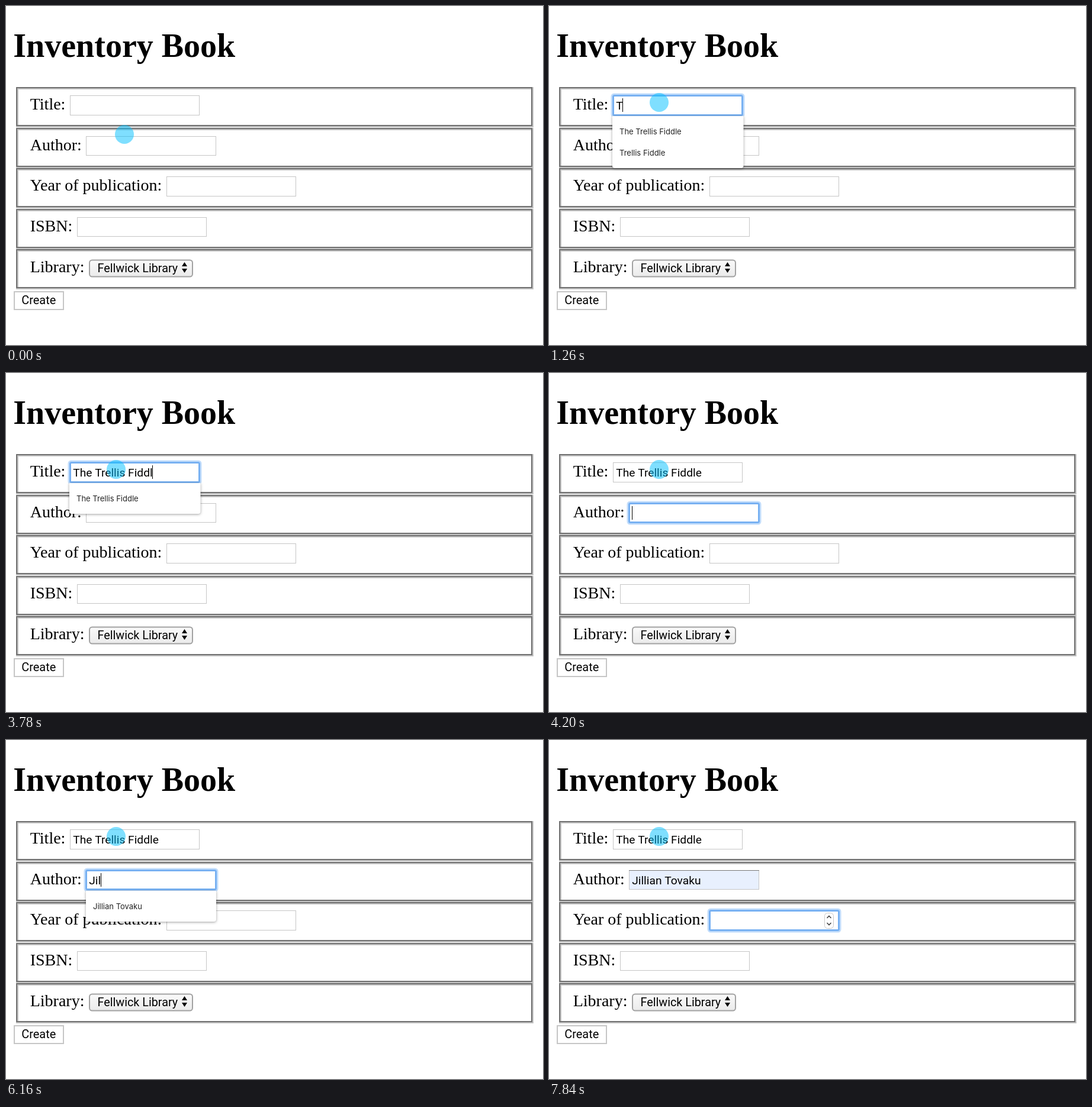
Write an HTML page with a canvas that moves like this. It is 907x573 px and loops after 8 s.

```html
<!DOCTYPE html>
<html lang="en">
<head>
<meta charset="utf-8">
<title>Inventory form</title>
<style>
  html, body { margin: 0; width: 100%; height: 100%; overflow: hidden; background: #fff; }
  canvas { display: block; }
</style>
</head>
<body>
<canvas id="stage" width="907" height="573"></canvas>
<script>
const ctx = document.getElementById('stage').getContext('2d');
const LOOP = 8000;

const SERIF = '"Liberation Serif", "Times New Roman", serif';
const INPUT = '19.2px Roboto, sans-serif';
const LIST = '13px Inter, sans-serif';

const BOOK = 'The Trellis Fiddle';
const WRITER = 'Jillian Tovaku';
const BOOKS = [BOOK, 'Trellis Fiddle', 'po', 'Lambc', 'Lamb'];

const title = { label: 'Title:', x: 108, y: 151, w: 219, h: 34 };
const author = { label: 'Author:', x: 135, y: 220, w: 220, h: 33 };
const year = { label: 'Year of publication:', x: 271, y: 288, w: 219, h: 34 };
const isbn = { label: 'ISBN:', x: 120, y: 357, w: 219, h: 33 };
const fields = [title, author, year, isbn];

// [time, value] steps: the last one reached is in force
const titleKeys = [[0, 0],
  [1260, 1], [1400, 2], [1540, 3], [1680, 4], [1820, 6], [1960, 7], [2100, 8], [2240, 9],
  [2660, 10], [2800, 11], [2940, 12], [3080, 13], [3220, 14],
  [3500, 15], [3640, 16], [3780, 17], [3920, 18]];
const authorKeys = [[0, 0], [4900, 1], [5040, 2], [5180, 3], [6440, WRITER.length]];
const focusKeys = [[0, null], [560, title], [4200, author], [7280, year]];
const caretKeys = [[0, true], [980, false], [1260, true], [4620, false], [4900, true],
  [5740, false], [6160, true], [6440, false], [6860, true], [7840, false]];
const dotKeys = [[0, [200, 217]], [140, [177, 165]], [280, [184, 181]], [840, [186, 163]]];
const bookListKeys = [[0, 0], [560, 5], [1260, 2], [1400, 1], [3920, 0]];

function at(keys, t) {
  let value = keys[0][1];
  for (const [time, next] of keys) if (t >= time) value = next;
  return value;
}

function rect(x, y, w, h, color) {
  ctx.fillStyle = color;
  ctx.fillRect(x, y, w, h);
}

function text(str, x, y, font, color = '#000') {
  ctx.font = font;
  ctx.fillStyle = color;
  ctx.fillText(str, x, y);
}

function rounded(x, y, w, h, r) {
  ctx.beginPath();
  ctx.roundRect(x, y, w, h, r);
}

function outline(color, width) {
  ctx.strokeStyle = color;
  ctx.lineWidth = width;
  ctx.stroke();
}

function polyline(points) {
  ctx.beginPath();
  for (const [x, y] of points) ctx.lineTo(x, y);
}

function groove(x, y, w, h) {
  const dark = '#707070', light = '#c4c4c4';
  rect(x, y, w, h, light);
  rect(x, y, w - 2, h - 2, dark);
  rect(x + 2, y + 2, w - 4, h - 4, dark);
  rect(x + 2, y + 2, w - 6, h - 6, light);
  rect(x + 4, y + 4, w - 8, h - 8, '#fff');
}

function drawField(f, value, focused, filled, caret) {
  const { x, y, w, h } = f;
  rect(x, y, w, h, '#c6c6c6');
  rect(x + 1, y + 1, w - 2, h - 2, filled ? '#e8f0fe' : '#fff');
  if (filled) rect(x, y, w, 1, '#777');
  if (focused) {
    rounded(x - 1, y - 1, w + 2, h + 2, 3);
    outline('rgba(120,180,246,.45)', 5);
    rounded(x + .5, y + .5, w - 1, h - 1, 2);
    outline('#78b1f2', 3);
  }
  text(value, x + 5.2, y + 24, INPUT);
  if (focused && caret) {
    const end = x + 5 + ctx.measureText(value).width;
    rect(Math.round(end), y + 5, 1, 23, '#000');
  }
}

function drawList(f, items, picked, alpha = 1) {
  if (!items.length) return;
  const x = f.x - (f === title ? 1 : 0), y = f.y + 35, w = f === title ? 221.5 : 220;
  ctx.save();
  ctx.globalAlpha = alpha;
  ctx.shadowColor = 'rgba(0,0,0,.38)';
  ctx.shadowBlur = 4;
  ctx.shadowOffsetY = 1;
  ctx.fillStyle = '#fff';
  rounded(x, y, w, items.length * 36 + 16, [0, 0, 4, 4]);
  ctx.fill();
  ctx.shadowColor = 'transparent';
  items.forEach((item, i) => {
    if (picked) rect(x, y + 8 + i * 36, w, 36, '#ebebeb');
    text(item, x + 12, y + 31 + i * 36, LIST, '#222');
  });
  ctx.restore();
}

function drawSelect() {
  const fill = ctx.createLinearGradient(0, 429, 0, 458);
  fill.addColorStop(0, '#fafafa');
  fill.addColorStop(1, '#eaeaea');
  rounded(141, 429.5, 174, 28, 4.5);
  ctx.fillStyle = fill;
  ctx.fill();
  outline('#a2a2a2', 2);
  text('Fellwick Library', 154.5, 450, '19.8px Roboto, sans-serif');
  for (const [base, tip] of [[440, 433], [444, 451]]) {
    polyline([[297, base], [306, base], [301.5, tip]]);
    ctx.fill();
  }
}

function drawSpinner() {
  rounded(465.5, 292.5, 15, 26, 5);
  ctx.fillStyle = '#fff';
  ctx.fill();
  outline('#c8c8c8', 1);
  for (const [base, tip] of [[301, 297.5], [309, 312.5]]) {
    polyline([[469.5, base], [473, tip], [476.5, base]]);
    outline('#444', 1.6);
  }
}

function drawPointer(t) {
  const [x, y] = at(dotKeys, t);
  const pressed = t >= 560 && t < 700;
  ctx.beginPath();
  ctx.arc(x, y, pressed ? 19.5 : 16, 0, Math.PI * 2);
  if (pressed) {
    outline('rgba(0,180,240,.32)', 2.5);
  } else {
    ctx.fillStyle = 'rgba(0,191,255,.5)';
    ctx.fill();
  }
}

function draw(t) {
  rect(0, 0, 907, 573, '#fff');
  text('Inventory Book', 12.3, 86, 'bold 56px ' + SERIF);

  for (let i = 0; i < 5; i++) {
    const top = Math.round(137 + i * 68.5);
    groove(17, top, 874, 68);
    const label = i < 4 ? fields[i].label : 'Library:';
    text(label, 40.7, Math.round(175 + i * 68.7), '28px ' + SERIF);
  }

  const focus = at(focusKeys, t);
  const caret = at(caretKeys, t);
  for (const f of fields) {
    let value = '';
    if (f === title) value = BOOK.slice(0, at(titleKeys, t));
    if (f === author) value = WRITER.slice(0, at(authorKeys, t));
    drawField(f, value, f === focus, f === author && t >= 6440, caret);
  }
  if (focus === year) drawSpinner();

  drawSelect();
  rect(13, 482, 85, 32, '#c6c6c6');
  rect(15, 484, 81, 28, '#fff');
  text('Create', 26.3, 504, '19.9px Roboto, sans-serif');

  drawList(title, BOOKS.slice(0, at(bookListKeys, t)), false);
  if (t >= 4900 && t < 7000) drawList(author, [WRITER], t >= 6440, t < 6860 ? 1 : .5);
  drawPointer(t);
}

const start = performance.now();
function tick() {
  draw((performance.now() - start) % LOOP);
  requestAnimationFrame(tick);
}
tick();
</script>
</body>
</html>
```
